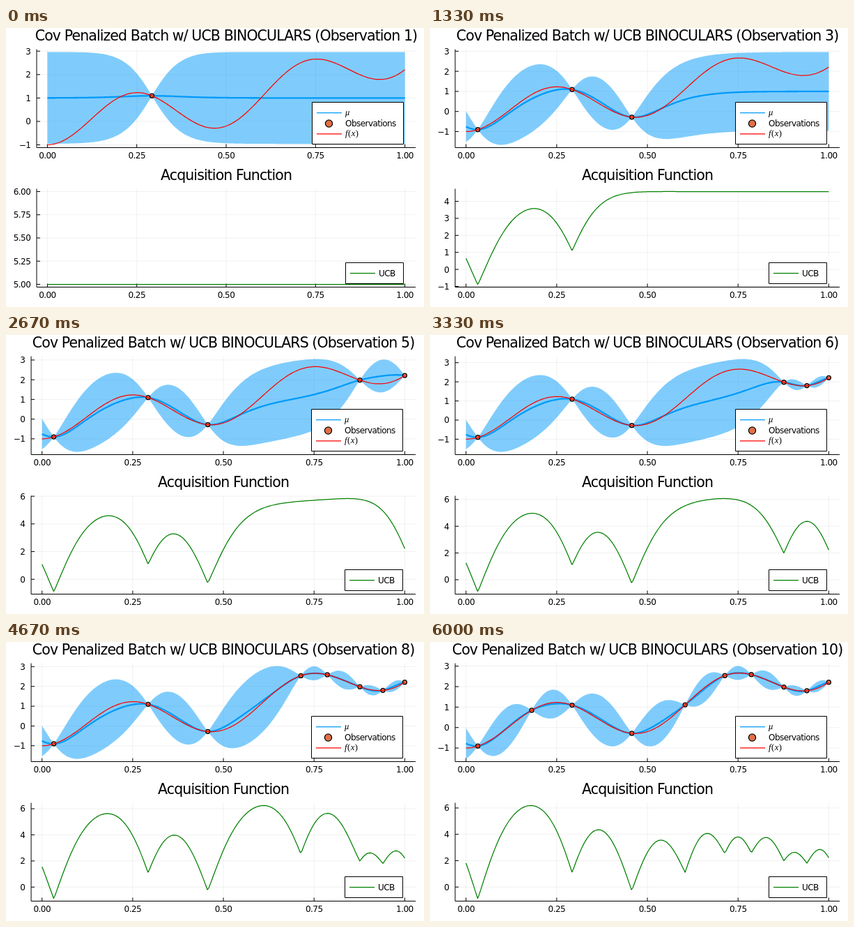
Recreate the animation shown at these times as an HTML page with a canvas. Size 600 px wide and 400 px high, loop 6670 ms.

```html
<!DOCTYPE html>
<html lang="en">
<head>
<meta charset="utf-8">
<title>Bayesian optimisation</title>
<style>
  html, body { margin: 0; width: 100%; height: 100%; overflow: hidden; background: #fff; }
  canvas { display: block; }
</style>
</head>
<body>
<canvas id="stage" width="600" height="400"></canvas>
<script>
const ctx = document.getElementById('stage').getContext('2d');
const SMALL = { font: '12px "DejaVu Sans", sans-serif', spacing: '-0.55px' };
const LARGE = { font: '20.5px "DejaVu Sans", sans-serif', spacing: '-0.9px' };
const MATH = { font: 'italic 12.5px "Liberation Serif", serif', spacing: '0.5px' };
const MATH_UPRIGHT = { font: '12.5px "Liberation Serif", serif', spacing: '0.5px' };
const BLUE = '#009af9', RED = '#f00', GREEN = '#008000';
const RIGHT = 588, PLOT_HEIGHT = 141, PAD = 0.03, THIN = 1.25;
const LOOP = 6670, HOLD = 2000 / 3;

const range = (n, fn) => Array.from({ length: n }, (_, i) => fn(i));
const dot = (a, b) => a.reduce((sum, v, i) => sum + v * b[i], 0);

// Objective and the places where it is sampled, in order.
const objective = x => 3.12 * x * x - Math.cos(13 * x) + 0.04 * Math.sin(2 * Math.PI * x);
const samples = [0.2925, 0.0325, 0.457, 1, 0.8763, 0.9397, 0.7135, 0.7865, 0.604, 0.181];
const grid = range(251, i => i / 250);

// Gaussian process with prior mean 1 and a Matérn 5/2 kernel.
function kernel(a, b) {
  const r = Math.sqrt(5) * Math.abs(a - b) / 0.1;
  return (1 + r + r * r / 3) * Math.exp(-r);
}

function invert(matrix) {
  const n = matrix.length;
  const m = matrix.map((row, i) => [...row, ...range(n, j => +(i === j))]);
  for (let c = 0; c < n; c++) {
    const pivot = m[c][c];
    m[c] = m[c].map(v => v / pivot);
    for (let r = 0; r < n; r++) {
      if (r === c) continue;
      const factor = m[r][c];
      m[r] = m[r].map((v, j) => v - factor * m[c][j]);
    }
  }
  return m.map(row => row.slice(n));
}

function posterior(xs) {
  const inverse = invert(xs.map((a, i) => xs.map((b, j) => kernel(a, b) + (i === j ? 1e-6 : 0))));
  const residuals = xs.map(x => objective(x) - 1);
  return grid.map(x => {
    const k = xs.map(s => kernel(x, s));
    const weights = inverse.map(row => dot(row, k));
    return { mean: 1 + dot(weights, residuals), sd: Math.sqrt(Math.max(0, 1 - dot(weights, k))) };
  });
}

function makeAxis(values, top) {
  let min = Math.min(...values), max = Math.max(...values);
  if (max - min < 1e-9) max = min + 1;
  const pad = PAD * (max - min);
  min -= pad;
  max += pad;
  const count = s => Math.floor(max / s) - Math.ceil(min / s) + 1;
  const step = [0.25, 0.5, 1, 2].find(s => count(s) <= 7);
  const digits = { 0.25: 2, 0.5: 1 }[step] || 0;
  const ticks = range(count(step), i => {
    const value = (Math.ceil(min / step) + i) * step;
    return { value, label: value.toFixed(digits).replace('-', '−') };
  });
  return { top, bottom: top + PLOT_HEIGHT, ticks, y: v => top + PLOT_HEIGHT * (max - v) / (max - min) };
}

const truth = grid.map(objective);
const scenes = samples.map((_, i) => {
  const model = posterior(samples.slice(0, i + 1));
  const t = i + 1, beta = Math.sqrt(5 * t - 1.8 - 0.05 * t * t);
  const mean = model.map(p => p.mean);
  const upper = model.map(p => p.mean + 1.96 * p.sd);
  const lower = model.map(p => p.mean - 1.96 * p.sd);
  const ucb = i ? posterior(samples.slice(0, i)).map(p => p.mean + beta * p.sd) : grid.map(() => 5);
  return {
    count: t, points: samples.slice(0, t), mean, upper, lower, ucb,
    modelAxis: makeAxis([...upper, ...lower, ...truth], 30.5),
    ucbAxis: makeAxis(ucb, 230.5)
  };
});

function setStyle({ font, spacing }) {
  ctx.font = font;
  ctx.letterSpacing = spacing;
}

function text(string, x, y, style = SMALL, align = 'left') {
  setStyle(style);
  ctx.textAlign = align;
  ctx.fillStyle = '#000';
  ctx.fillText(string, x, y);
}

function stroke(points, color, width = 1) {
  ctx.beginPath();
  points.forEach(([x, y]) => ctx.lineTo(x, y));
  ctx.strokeStyle = color;
  ctx.lineWidth = width;
  ctx.lineJoin = 'round';
  ctx.stroke();
}

function marker(x, y, radius) {
  ctx.beginPath();
  ctx.arc(x, y, radius, 0, 2 * Math.PI);
  ctx.fillStyle = '#e26f46';
  ctx.fill();
  ctx.strokeStyle = '#000';
  ctx.lineWidth = THIN;
  ctx.stroke();
}

function drawAxes(axis, left, toX, title) {
  const { top, bottom, ticks, y } = axis;
  const gridColor = 'rgba(0,0,0,0.06)';
  [0, 0.25, 0.5, 0.75, 1].forEach(v => {
    const x = toX(v);
    stroke([[x, top], [x, bottom]], gridColor);
    stroke([[x, bottom], [x, bottom - 5]], '#000');
    text(v.toFixed(2), x, bottom + 15.5, SMALL, 'center');
  });
  ticks.forEach(({ value, label }) => {
    const ty = y(value);
    stroke([[left, ty], [RIGHT, ty]], gridColor);
    stroke([[left, ty], [left + 5, ty]], '#000');
    text(label, left - 8.8, ty + 4.4, SMALL, 'right');
  });
  stroke([[left, top], [left, bottom], [RIGHT, bottom]], '#000');
  text(title, (left + RIGHT) / 2, top - 12.7, LARGE, 'center');
}

// Math labels are italic with upright parentheses.
function drawMath(label, x, y) {
  for (const char of label) {
    text(char, x, y, /[()]/.test(char) ? MATH_UPRIGHT : MATH);
    x += ctx.measureText(char).width;
  }
}

function drawLegend(axis, left, width, entries) {
  const row = 15.1, height = Math.round(row * (entries.length + 1));
  const x = Math.floor(RIGHT - 0.033 * (RIGHT - left) - width) + 0.5;
  const y = axis.bottom - 5 - height;
  ctx.fillStyle = '#fff';
  ctx.fillRect(x, y, width, height);
  ctx.strokeStyle = '#000';
  ctx.lineWidth = 1;
  ctx.strokeRect(x, y, width, height);
  entries.forEach(({ label, color, math }, i) => {
    const cy = y + row * (i + 1);
    if (color) stroke([[x + 6.5, cy], [x + 42.5, cy]], color, THIN);
    else marker(x + 24, cy + 0.3, 5.1);
    if (math) drawMath(label, x + 47.5, cy + 3.3);
    else text(label, x + 47.5, cy + 4.6);
  });
}

function draw(scene) {
  const { modelAxis, ucbAxis } = scene;
  ctx.fillStyle = '#fff';
  ctx.fillRect(0, 0, 600, 400);

  setStyle(SMALL);
  const labelWidth = Math.max(...[...modelAxis.ticks, ...ucbAxis.ticks].map(t => ctx.measureText(t.label).width));
  const left = 19.5 + labelWidth;
  const toX = v => left + (RIGHT - left) * (v + PAD) / (1 + 2 * PAD);
  const curve = (values, axis) => values.map((v, i) => [toX(grid[i]), axis.y(v)]);

  drawAxes(modelAxis, left, toX, `Cov Penalized Batch w/ UCB BINOCULARS (Observation ${scene.count})`);
  ctx.beginPath();
  [...curve(scene.upper, modelAxis), ...curve(scene.lower, modelAxis).reverse()]
    .forEach(([x, y]) => ctx.lineTo(x, y));
  ctx.fillStyle = 'rgba(0,154,249,0.5)';
  ctx.fill();
  stroke(curve(scene.mean, modelAxis), BLUE, 2.3);
  scene.points.forEach(x => marker(toX(x), modelAxis.y(objective(x)), 3));
  stroke(curve(truth, modelAxis), RED, THIN);
  drawLegend(modelAxis, left, 131, [
    { label: 'μ', color: BLUE, math: true },
    { label: 'Observations' },
    { label: 'f(x)', color: RED, math: true }
  ]);

  drawAxes(ucbAxis, left, toX, 'Acquisition Function');
  stroke(curve(scene.ucb, ucbAxis), GREEN, THIN);
  drawLegend(ucbAxis, left, 83, [{ label: 'UCB', color: GREEN }]);
}

function tick() {
  const time = performance.now() % LOOP;
  draw(scenes[Math.min(scenes.length - 1, Math.floor((time + 4) / HOLD))]);
  requestAnimationFrame(tick);
}
tick();
</script>
</body>
</html>
```
